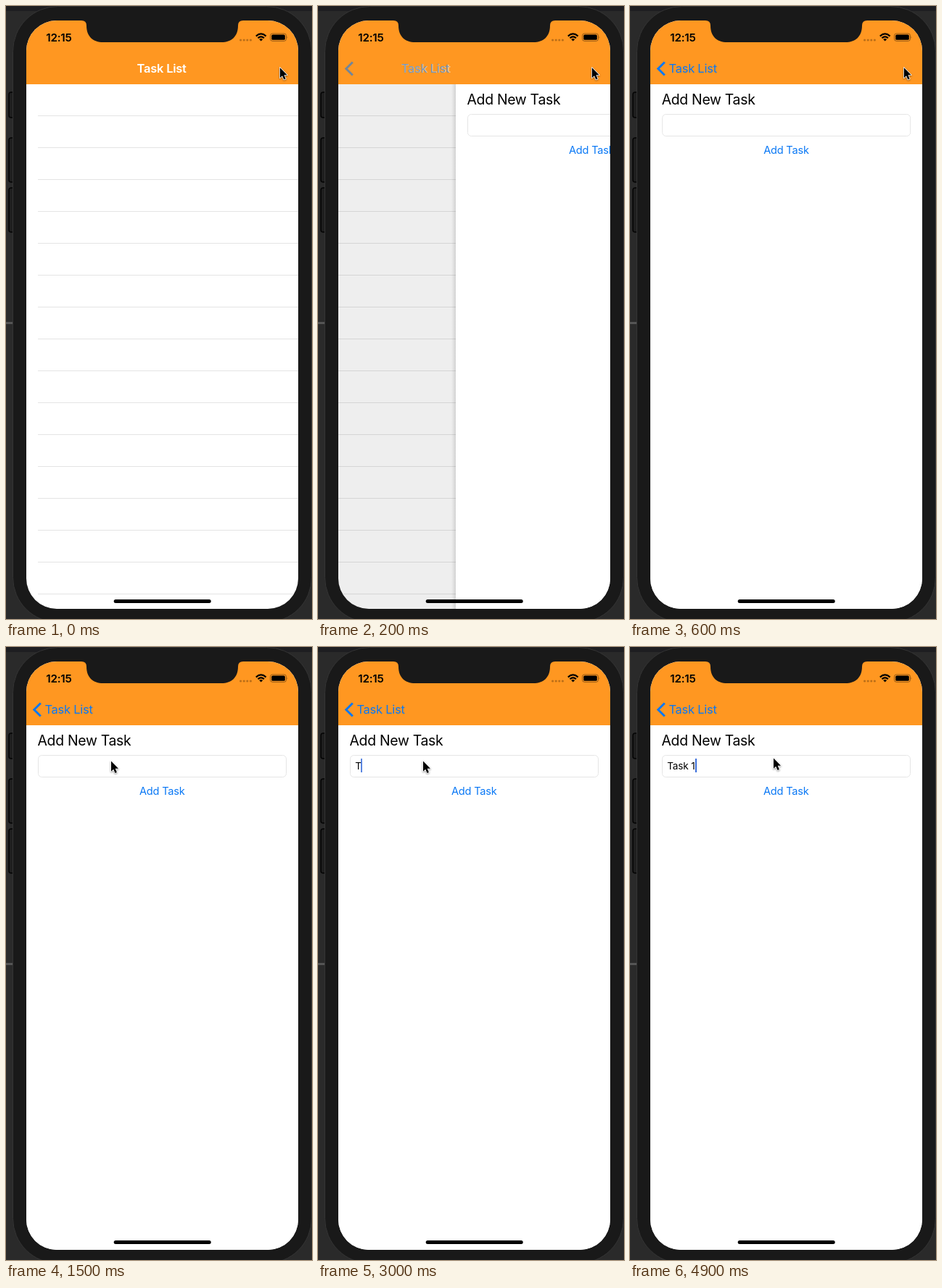
An HTML page for the animation above (5 s loop, 422 by 846 pixels).

```html
<!DOCTYPE html>
<html lang="en">
<head>
<meta charset="utf-8">
<title>Task List</title>
<style>
  html, body { margin: 0; height: 100%; overflow: hidden; background: #2a2a2a; }
  svg { display: block; width: 100vw; height: 100vh; }
  text { font-family: Inter, Roboto, sans-serif; letter-spacing: -.015em; white-space: pre; }
  .blue { fill: #0a78f5; }
  .nav { font-size: 16.5px; }
</style>
</head>
<body>
<svg viewBox="0 0 422 846">
  <defs>
    <clipPath id="screen"><rect x="28" y="20" width="375" height="812" rx="42"/></clipPath>
    <linearGradient id="edge">
      <stop offset="0" stop-opacity="0"/>
      <stop offset="1" stop-opacity=".12"/>
    </linearGradient>
  </defs>

  <!-- Desktop and phone body -->
  <rect width="422" height="846" fill="#2a2a2a"/>
  <rect width="422" height="7" fill="#1e1e21"/>
  <rect y="436" width="9" height="3" fill="#555"/>
  <g fill="#1f1f1f" stroke="#050505" stroke-width="1.6">
    <rect x="4" y="119" width="12" height="35" rx="3"/>
    <rect x="4" y="182" width="12" height="61" rx="3"/>
    <rect x="4" y="251" width="12" height="61" rx="3"/>
  </g>
  <rect x="9.5" y=".5" width="412" height="850" rx="62" fill="#191919" stroke="#343434"/>

  <g clip-path="url(#screen)">
    <rect x="28" y="20" width="375" height="812" fill="#fff"/>
    <path id="rows" stroke="#e4e4e4"/>
    <rect id="dim" x="28" y="108" width="375" height="724"/>

    <g id="panel">
      <rect x="22" y="108" width="6" height="724" fill="url(#edge)"/>
      <rect x="28" y="108" width="375" height="724" fill="#fff"/>
      <text x="43.5" y="136" font-size="19.4">Add New Task</text>
      <rect x="44.5" y="149.5" width="342" height="30" rx="5" fill="#fff" stroke="#e5e5e5"/>
      <text id="entry" x="51.3" y="168.7" font-size="13.6"></text>
      <rect id="caret" y="154" width="2" height="19" fill="#3d70dc"/>
      <text class="blue" x="215.3" y="204.3" font-size="14.6" text-anchor="middle">Add Task</text>
    </g>

    <!-- Navigation and status bars -->
    <rect x="28" y="20" width="375" height="88" fill="#ff9721"/>
    <path id="chevron" d="M47.8 77.5 38.8 86.5 47.8 95.5" fill="none" stroke="#0a78f5" stroke-width="3"/>
    <text id="title" class="nav" y="92" fill="#fff" font-weight="600">Task List</text>
    <text id="back" class="nav blue" y="92">Task List</text>
    <text x="55.3" y="48.5" font-size="15.2" font-weight="600">12:15</text>
    <g opacity=".27">
      <circle cx="323.6" cy="47" r="1.6"/><circle cx="328.2" cy="47" r="1.6"/>
      <circle cx="332.8" cy="47" r="1.6"/><circle cx="337.4" cy="47" r="1.6"/>
    </g>
    <path d="M344.8 41.6Q351.7 35.3 358.6 41.6M347.4 44.3Q351.7 40.5 356 44.3" fill="none" stroke="#000" stroke-width="2.1"/>
    <path d="M349.2 45.9Q351.7 43.9 354.2 45.9L351.7 48.5Z"/>
    <rect x="364.5" y="38" width="22" height="10.4" rx="3" fill="none" stroke="#000" opacity=".4"/>
    <rect x="366.2" y="39.6" width="18.6" height="7.2" rx="1.6"/>
    <path d="M387.6 41.5q1.6 1.7 0 3.4z" opacity=".45"/>
    <path d="M104 19V20Q111 20 111 27C111 42 120 50 134 50H297C311 50 320 42 320 27Q320 20 327 20V19Z" fill="#191919"/>
    <rect x="148.7" y="819" width="134" height="5" rx="2.5"/>
  </g>

  <path id="cursor" d="M0 0V14.2L3.2 11.2 5.5 16.4 7.9 15.4 5.7 10.3H10Z"
        stroke="#fff" stroke-width="1.6" stroke-linejoin="round" paint-order="stroke"
        style="filter:drop-shadow(0 1px 1px #0006)"/>
</svg>
<script>
const LOOP = 5000, STEP = 100;
const el = id => document.getElementById(id);
const set = (id, attrs) => {
  for (const name in attrs) el(id).setAttribute(name, attrs[name]);
};
const clamp = v => Math.min(1, Math.max(0, v));
const mix = (a, b, p) => a + (b - a) * p;
const smooth = p => p * p * (3 - 2 * p);

el("rows").setAttribute("d",
  Array.from({ length: 16 }, (_, i) => `M44 ${151.5 + 44 * i}H520`).join(""));

// Critically damped push: 1 before the page enters, 0 when it has settled.
function remaining(t) {
  const x = Math.max(0, t - 107) * .0205;
  return t < 700 ? (1 + x) * Math.exp(-x) : 0;
}

// When each state of the text field begins, and where its caret stands.
const typing = [
  [0, "", 51], [2400, "T", 59], [3600, "Ta", 66.5], [3800, "Tas", 73],
  [4200, "Task", 80], [4600, "Task ", 84], [4700, "Task 1", 90]
];

function caretOpacity(t) {
  if (t < 2400) return clamp((t - 1800) / 400);
  if (t >= 3000 && t < 3600) return clamp(1 - (t - 2950) / 300);
  return 1;
}

function cursorAt(t) {
  if (t >= 4900) return [198, 153.5];
  if (t >= 1300) return [145, 157.5];
  const p = smooth(clamp((t - 600) / 600));
  return [mix(377.8, 144, p), mix(85, 160, p)];
}

function draw(t) {
  const r = remaining(t);
  set("rows", { transform: `translate(${-112 * (1 - r)})` });
  set("dim", { opacity: .115 * (1 - r) });
  set("panel", { transform: `translate(${375 * r})`, opacity: r < 1 ? 1 : 0 });

  const titleX = 53.4 + 127.2 * r + 26 * r * (1 - r);
  set("title", { x: titleX, opacity: r });
  set("back", { x: titleX, opacity: 1 - r });
  set("chevron", { opacity: 1 - r });

  const [, text, caretX] = typing.filter(([start]) => start <= t).pop();
  el("entry").textContent = text;
  set("caret", { x: caretX, opacity: caretOpacity(t) });
  set("cursor", { transform: `translate(${cursorAt(t)})` });
}

function frame() {
  const t = performance.now() % LOOP;
  draw(Math.floor(t / STEP) * STEP);
  requestAnimationFrame(frame);
}
frame();
</script>
</body>
</html>
```
